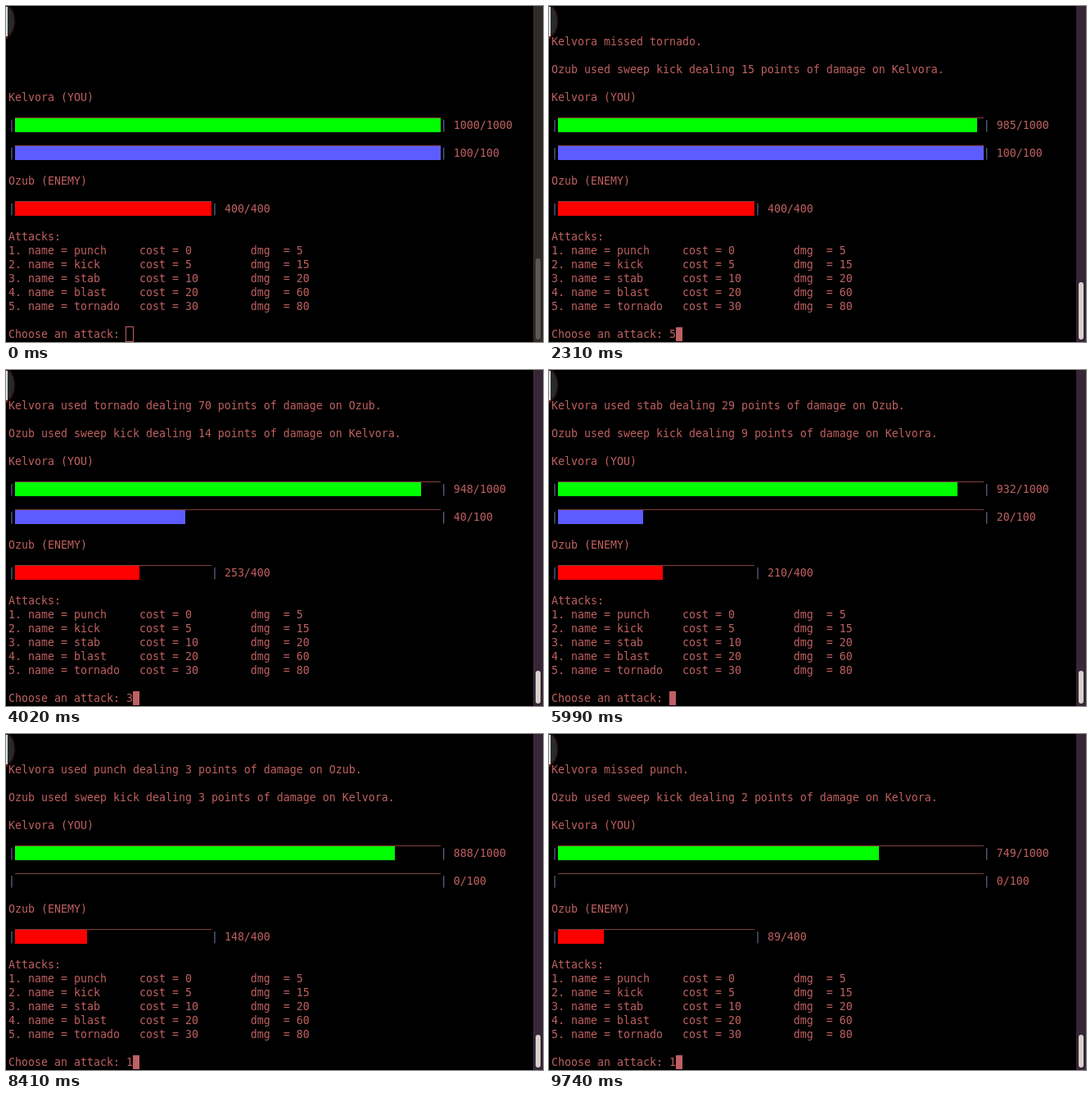
Animation of 656x410 px, one loop 9.84 s. Source, as an HTML page:

```html
<!DOCTYPE html>
<html lang="en">
<head>
<meta charset="utf-8">
<title>Terminal battle</title>
<style>
  html, body { margin: 0; width: 100%; height: 100%; overflow: hidden; background: #000; }
  #stage { position: relative; width: 656px; height: 410px; overflow: hidden; background: #000; }
  #stage > * { position: absolute; box-sizing: border-box; }
  pre { left: 3px; top: 1px; margin: 0; color: #bf6060; white-space: pre;
        font: 13.29px/17px "DejaVu Sans Mono", monospace; }
  pre i { font-style: normal; color: #65709a; }
  .line { left: 11px; height: 1px; background: #823f3d; }
  .bar { left: 11px; height: 17px; }
  #cursor { background: #bf6064; }
  #cursor.hollow { background: none; border: 1px solid #bf6064; }
  #track { left: 644px; top: 0; width: 12px; height: 410px; }
  #thumb { left: 647px; width: 6px; border-radius: 3px; }
  #glow { left: -12px; top: -3px; width: 24px; height: 43px; border-radius: 50%;
          background: radial-gradient(closest-side, #272a2b 78%, #2a0d0d 86%, #000); }
  #edge { left: 0; top: 1px; width: 2px; height: 36px; background: #dcdcda; }
  #tip { left: 0; top: 37px; width: 2px; height: 3px; background: #5c1512; }
</style>
</head>
<body>
<div id="stage">
  <div id="glow"></div><div id="edge"></div><div id="tip"></div>
  <pre id="text"></pre>
  <div id="cursor"></div>
  <div id="track"></div><div id="thumb"></div>
  <svg id="mouse" style="left:385px;top:401px" width="9" height="11" shape-rendering="crispEdges">
    <path d="M1 .5H4M5 .5H8M4.5 1V11M3 5.5H6" stroke="#e8e8e8" fill="none"/>
  </svg>
</div>
<script>
const LOOP = 9840, CELL = 8, ROW = 17;
const HERO = "Kelvora", FOE = "Ozub";
const $ = id => document.getElementById(id);
const stage = $("stage"), text = $("text"), cursor = $("cursor"), thumb = $("thumb");

// time typed, key, time entered, hero damage (0 = miss), foe damage, mana left
const TURNS = [
  [1610, 5, 1820, 0, 15, 100],
  [2310, 5, 2520, 77, 23, 70],
  [3000, 5, 3160, 70, 14, 40],
  [4020, 3, 4260, 14, 7, 30],
  [4670, 3, 4900, 29, 9, 20],
  [6060, 3, 6260, 23, 10, 10],
  [6700, 3, 6880, 25, 12, 0],
  [7850, 1, 8000, 11, 19, 0],
  [8150, 1, 8270, 3, 3, 0],
  [8410, 1, 8560, 12, 28, 0],
  [8770, 1, 8830, 13, 31, 0],
  [9000, 1, 9080, 9, 24, 0],
  [9180, 1, 9260, 12, 26, 0],
  [9360, 1, 9440, 13, 28, 0],
  [9540, 1, 9640, 0, 2, 0],
  [9740, 1, LOOP, 0, 0, 0]
];
const BLINK_OFF = [[950, 1540], [3670, 3950], [5400, 5990], [7380, 7780]];
const THUMB_TOP = [[0, 308], [1890, 337], [2590, 367]];
const FOCUS = 410, FADE = 200, MOUSE = [480, 1610];

const ATTACKS = [["punch", 0, 5], ["kick", 5, 15], ["stab", 10, 20], ["blast", 20, 60], ["tornado", 30, 80]];
const menu = ATTACKS.map(([name, cost, dmg], i) =>
  `${i + 1}. name = ${name}`.padEnd(20) + `cost = ${cost}`.padEnd(17) + `dmg  = ${dmg}`);

const hit = (who, move, dmg, whom) => `${who} used ${move} dealing ${dmg} points of damage on ${whom}.`;

// Running totals give the screen after every turn.
const screens = [{ at: 0, log: ["", ""], hp: 1000, mana: 100, foe: 400 }];
for (const [, key, at, dealt, taken, mana] of TURNS) {
  const last = screens[screens.length - 1], move = ATTACKS[key - 1][0];
  screens.push({
    at, mana, hp: last.hp - taken, foe: last.foe - dealt,
    log: [
      dealt ? hit(HERO, move, dealt, FOE) : `${HERO} missed ${move}.`,
      hit(FOE, taken > 20 ? "flying kick" : "sweep kick", taken, HERO)
    ]
  });
}

function makeBar(row, cells, max, color) {
  const add = cls => stage.appendChild(Object.assign(document.createElement("div"), { className: cls }));
  const line = add("line"), fill = add("bar"), top = row * ROW + 1;
  line.style.cssText = `top:${top - 1}px;width:${cells * CELL}px`;
  fill.style.cssText = `top:${top}px;background:${color}`;
  return {
    set(value) {
      const x = value * cells / max, r = Math.round(x);
      const even = r - x === 0.5 && r % 2 ? r - 1 : r;
      fill.style.width = even * CELL + "px";
    },
    label: value => `<i>|</i>${" ".repeat(cells)}<i>|</i> ${value}/${max}`
  };
}
const hpBar = makeBar(8, 65, 1000, "#00ff00");
const manaBar = makeBar(10, 65, 100, "#5c5cff");
const foeBar = makeBar(14, 30, 400, "#ff0000");

function drawScreen(s, typed) {
  hpBar.set(s.hp);
  manaBar.set(s.mana);
  foeBar.set(s.foe);
  text.innerHTML = [
    " ", "", s.log[0], "", s.log[1], "", `${HERO} (YOU)`, "",
    hpBar.label(s.hp), "", manaBar.label(s.mana), "", `${FOE} (ENEMY)`, "",
    foeBar.label(s.foe), "", "Attacks:", ...menu, "", "Choose an attack: " + typed
  ].join("\n");
}

const mix = (a, b, k) => `rgb(${a.map((v, i) => Math.round(v + (b[i] - v) * k))})`;
const latest = (list, t, time) => list.filter(e => time(e) <= t).pop();
const within = ([a, b], t) => t >= a && t < b;

let shown = "";
function frame() {
  const t = performance.now() % LOOP;
  const screen = latest(screens, t, s => s.at);
  const turn = TURNS.find(([from, , to]) => within([from, to], t));
  const typed = turn ? String(turn[1]) : "";
  const key = screen.at + ":" + typed;
  if (key !== shown) drawScreen(screen, typed);
  shown = key;

  const out = t < FOCUS ? 1 : 0;
  cursor.className = out ? "hollow" : "";
  cursor.style.left = 147 + typed.length * CELL - out + "px";
  cursor.style.top = 392 - out + "px";
  cursor.style.width = CELL + 2 * out + "px";
  cursor.style.height = ROW + 2 * out + "px";
  cursor.style.visibility = BLINK_OFF.some(b => within(b, t)) ? "hidden" : "visible";

  const k = Math.min(1, Math.max(0, (t - FOCUS) / FADE));
  const top = latest(THUMB_TOP, t, e => e[0])[1];
  $("track").style.background = mix([46, 43, 41], [55, 39, 54], k);
  thumb.style.background = mix([92, 89, 85], [214, 209, 203], k);
  thumb.style.top = top + "px";
  thumb.style.height = 407 - top + "px";
  $("mouse").style.visibility = within(MOUSE, t) ? "visible" : "hidden";
  requestAnimationFrame(frame);
}
frame();
</script>
</body>
</html>
```
